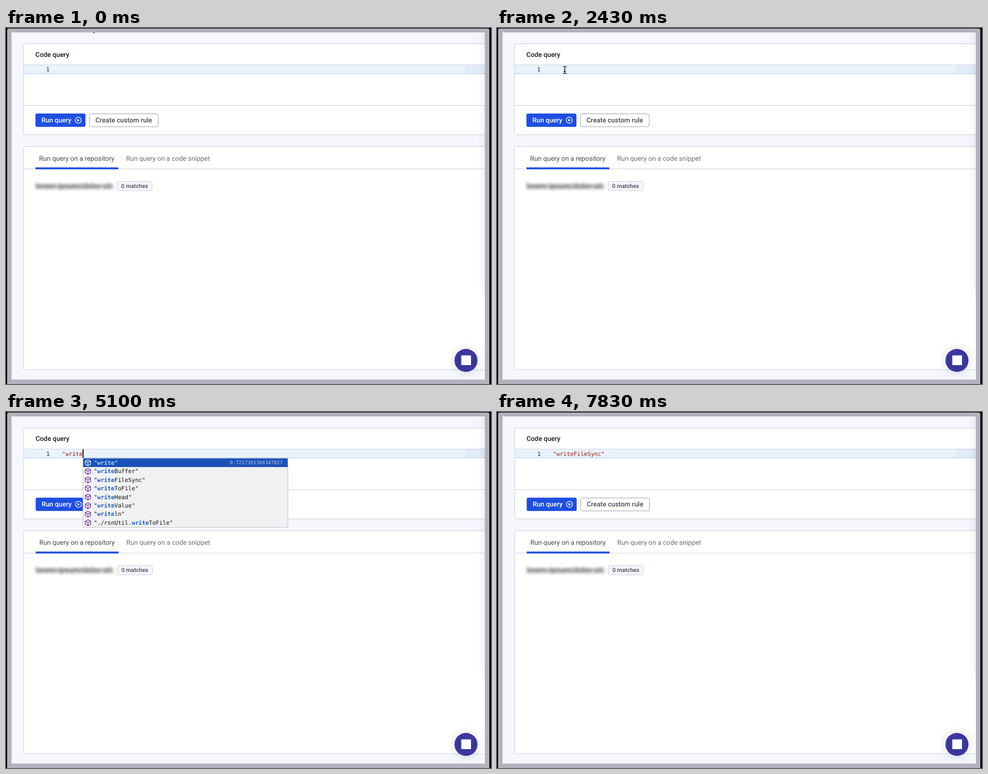
Animation of 873 by 641 pixels, one loop 8000 ms. Source, as an HTML page:

```html
<!DOCTYPE html>
<html lang="en">
<head>
<meta charset="utf-8">
<title>Code query</title>
<style>
  html, body { margin: 0; width: 100%; height: 100%; overflow: hidden; background: #000; }
  svg { display: block; width: 873px; height: 641px; }
  text { white-space: pre; text-rendering: geometricPrecision; font: 12px Roboto, sans-serif; }
  .medium { font-weight: 500; }
  .mono { font: 10.3px "DejaVu Sans Mono", monospace; }
  .panel { fill: #fffffe; stroke: #d1d1de; }
  .rule { fill: none; stroke: #d1d1de; }
  .popup { fill: #f1f1f4; stroke: #c3c3cc; }
</style>
</head>
<body>
<svg viewBox="0 0 873 641">
  <defs>
    <clipPath id="inner"><rect x="10" y="8" width="852" height="625"/></clipPath>
    <filter id="shade" x="-200%" y="-20%" width="500%" height="140%"><feGaussianBlur stdDeviation="10"/></filter>
    <filter id="smear" x="-10%" y="-100%" width="120%" height="300%"><feGaussianBlur stdDeviation="2.6"/></filter>
    <filter id="halo" x="-50%" y="-50%" width="200%" height="200%"><feGaussianBlur stdDeviation="6"/></filter>
  </defs>
  <rect width="873" height="641" fill="#000"/>
  <rect x="2" y="1" width="868" height="644" rx="3" fill="#b3b2bd"/>
  <rect x="10" y="8" width="852" height="625" fill="#f6f6fd"/>

  <g clip-path="url(#inner)">
    <g id="page">
      <rect class="panel" x="31.5" y="28.5" width="860" height="163.5" rx="3"/>
      <text class="medium" x="52.8" y="51.5" fill="#16161f">Code query</text>
      <rect x="32" y="67" width="840" height="15" fill="#e9f3fd"/>
      <rect x="826" y="67" width="40" height="15" fill="#e3ebf9"/>
      <path class="rule" d="M32 66.5H872M32 139.5H872"/>
      <path d="M32 82.3H872" stroke="#b3cdf3"/>
      <text class="mono" x="72.2" y="78.4" fill="#0b216f">1</text>
      <text id="code" class="mono" x="100.3" y="78.4" fill="#9c1a1a"></text>

      <rect x="53" y="154" width="90" height="24" rx="3" fill="#1f4fe0"/>
      <text class="medium" x="63.8" y="170.2" fill="#fff">Run query</text>
      <circle cx="130" cy="166" r="5.4" fill="none" stroke="#fff" stroke-width="1.2"/>
      <path d="M128.4 163.4L132.6 166L128.4 168.6Z" fill="#fff"/>
      <rect x="150.2" y="154.5" width="123.8" height="23.3" rx="3" fill="#fffffe" stroke="#a3a3b0"/>
      <text class="medium" x="161" y="170.2" fill="#474754">Create custom rule</text>

      <rect class="panel" x="31.5" y="213.5" width="860" height="401.5" rx="3"/>
      <path class="rule" d="M32 253.8H872"/>
      <rect x="53" y="251" width="149.3" height="3.4" fill="#1f4fe0"/>
      <text x="59.6" y="238.7" fill="#454552">Run query on a repository</text>
      <text x="216.2" y="238.7" fill="#6b6b78">Run query on a code snippet</text>

      <g filter="url(#smear)" fill="#63636b">
        <text class="medium" x="53" y="289" style="font-size:14px">lorem-ipsum/dolor-sit</text>
        <rect x="53" y="281" width="141" height="9" opacity=".3"/>
      </g>
      <rect x="200" y="276.3" width="63" height="16.5" rx="3" fill="#f6f6fc" stroke="#cfcfdc"/>
      <text class="medium" x="207.3" y="288.2" fill="#454552" style="font-size:10.3px">0 matches</text>
    </g>

    <rect x="869" y="-60" width="80" height="530" fill="#3c3c58" opacity=".36" filter="url(#shade)"/>
    <circle cx="828" cy="599" r="25" fill="#30305c" opacity=".1" filter="url(#halo)"/>
    <circle cx="828" cy="598.5" r="20.7" fill="#3a379c"/>
    <rect x="819.5" y="589.5" width="17.5" height="17.5" fill="#fff"/>

    <g id="empty">
      <rect class="popup" x="132.5" y="83" width="184" height="16.8" rx="2"/>
      <text x="152" y="96" style="font:14px 'Liberation Sans', Arial, sans-serif" fill="#111">No suggestions.</text>
    </g>
    <g id="list"><rect class="popup" x="138.5" y="83.2" width="368.8" height="124.6" rx="2"/></g>
    <rect id="caret" y="67" width="1.7" height="15.6" fill="#000"/>

    <path id="arrow" d="M0 0V14.5L3.3 11.5L5.4 16.4L8 15.2L6 10.4H10.3Z" fill="#000" stroke="#fff" stroke-width=".9"/>
    <g id="beam" fill="none">
      <path id="beamHalo" stroke="#fff" stroke-width="2.6" opacity=".8"/>
      <path id="beamLine" stroke="#111" stroke-width="1.3"/>
    </g>
  </g>
</svg>
<script>
const LOOP = 8000, ADVANCE = 6.2;
const $ = id => document.getElementById(id);

// Editor states: start time, text, caret shown
const WORD = '"write';
const edits = [
  [0, '', 0], [930, '', 1], [1430, '', 0], [1930, '', 1], [2430, '', 0],
  [2800, '"', 1], [3130, '"w', 1], [3630, '"w', 0], [3660, '"wr', 1],
  [3800, '"wri', 1], [3900, '"writ', 1], [4060, WORD, 1], [4560, WORD, 0],
  [5100, WORD, 1], [5560, WORD, 0], [6100, WORD, 1], [6560, WORD, 0], [7100, WORD, 1],
  [7330, '"writeFileSync"', 1], [7830, '"writeFileSync"', 0]
];

// Pointer path: time, x, y
const track = [
  [0, 152, -6.5], [130, 140, 10], [300, 112, 39], [460, 95, 58], [530, 95, 65],
  [630, 107, 79.5], [799, 107, 79.5], [800, 106, 79.5], [1400, 106, 79.5], [1430, 122, 75.5]
];

// Suggestions: text around the matched word, score
const items = [
  ['"', '"', '0.7217391304347827'], ['"', 'Buffer"', '0.1217391304347826'],
  ['"', 'FileSync"', '0.0391304347826087'], ['"', 'ToFile"'], ['"', 'Head"'],
  ['"', 'Value"'], ['"', 'ln"'], ['"./rsnUtil.', 'ToFile"']
];

function el(parent, tag, attrs, text) {
  const node = document.createElementNS('http://www.w3.org/2000/svg', tag);
  for (const key in attrs) node.setAttribute(key, attrs[key]);
  if (text) node.textContent = text;
  return parent.appendChild(node);
}

function show(node, on) { node.setAttribute('visibility', on ? 'visible' : 'hidden'); }
function place(node, x, y) { node.setAttribute('transform', `translate(${x} ${y})`); }

const rows = items.map(([before, after, score], i) => {
  const g = el($('list'), 'g', { transform: `translate(139 ${83.6 + 15.43 * i})` });
  const bar = el(g, 'rect', { width: 368, height: 15.5, fill: '#1a51b8' });
  const icon = el(g, 'path', {
    d: 'M8.5 2.4L13.3 4.9V10.4L8.5 13.2L3.7 10.4V4.9ZM3.7 4.9L8.5 7.5L13.3 4.9M8.5 7.5V13.2',
    fill: 'none', 'stroke-width': 1.1, 'stroke-linejoin': 'round'
  });
  const label = el(g, 'text', { class: 'mono', x: 19, y: 11.3 });
  el(label, 'tspan', {}, before);
  const match = el(label, 'tspan', { 'font-weight': 700 }, 'write');
  el(label, 'tspan', {}, after);
  const detail = el(g, 'text', {
    class: 'mono', x: 359, y: 10.8, 'text-anchor': 'end', fill: '#b4c9ef', style: 'font-size:8.77px'
  }, score);
  return { bar, icon, label, match, detail };
});

const beamPath = 'M-3.4 -6.4Q-.6 -6.4 0 -4.8Q.6 -6.4 3.4 -6.4M0 -4.8V5.2M-3.4 6.8Q-.6 6.8 0 5.2Q.6 6.8 3.4 6.8M-2 2.6H2';
$('beamHalo').setAttribute('d', beamPath);
$('beamLine').setAttribute('d', beamPath);

function pointerAt(t) {
  const i = track.findIndex(p => p[0] > t);
  if (i < 0) return track[track.length - 1].slice(1);
  const [a, b] = [track[i - 1], track[i]];
  const k = (t - a[0]) / (b[0] - a[0]);
  return [a[1] + (b[1] - a[1]) * k, a[2] + (b[2] - a[2]) * k];
}

function draw(t) {
  const shift = t >= 3800 ? 0.4 : 0;
  place($('page'), shift, shift * 0.75);

  const [, text, caretOn] = edits.filter(e => e[0] <= t).pop();
  $('code').textContent = text;
  $('caret').setAttribute('x', 100.2 + shift + ADVANCE * text.length);
  show($('caret'), caretOn);

  const [x, y] = pointerAt(t);
  const inEditor = y > 68;
  place($('arrow'), x, y);
  place($('beam'), x, y);
  show($('arrow'), !inEditor);
  show($('beam'), inEditor && t < 2800);

  show($('empty'), t >= 4160 && t < 4700 || t >= 4730 && t < 4900);
  place($('empty'), t < 4730 ? 0 : ADVANCE, 0);

  const open = t >= 4900 && t < 7330;
  const selected = t < 6700 ? 0 : t < 6900 ? 1 : 2;
  show($('list'), open);
  rows.forEach((row, i) => {
    const on = i === selected;
    show(row.bar, open && on);
    show(row.detail, open && on);
    row.icon.setAttribute('stroke', on ? '#fff' : '#652d90');
    row.label.setAttribute('fill', on ? '#fff' : '#111');
    row.match.setAttribute('fill', on ? '#b5d6ff' : '#1a5cc2');
  });
}

function tick() {
  draw(performance.now() % LOOP);
  requestAnimationFrame(tick);
}
tick();
</script>
</body>
</html>
```
